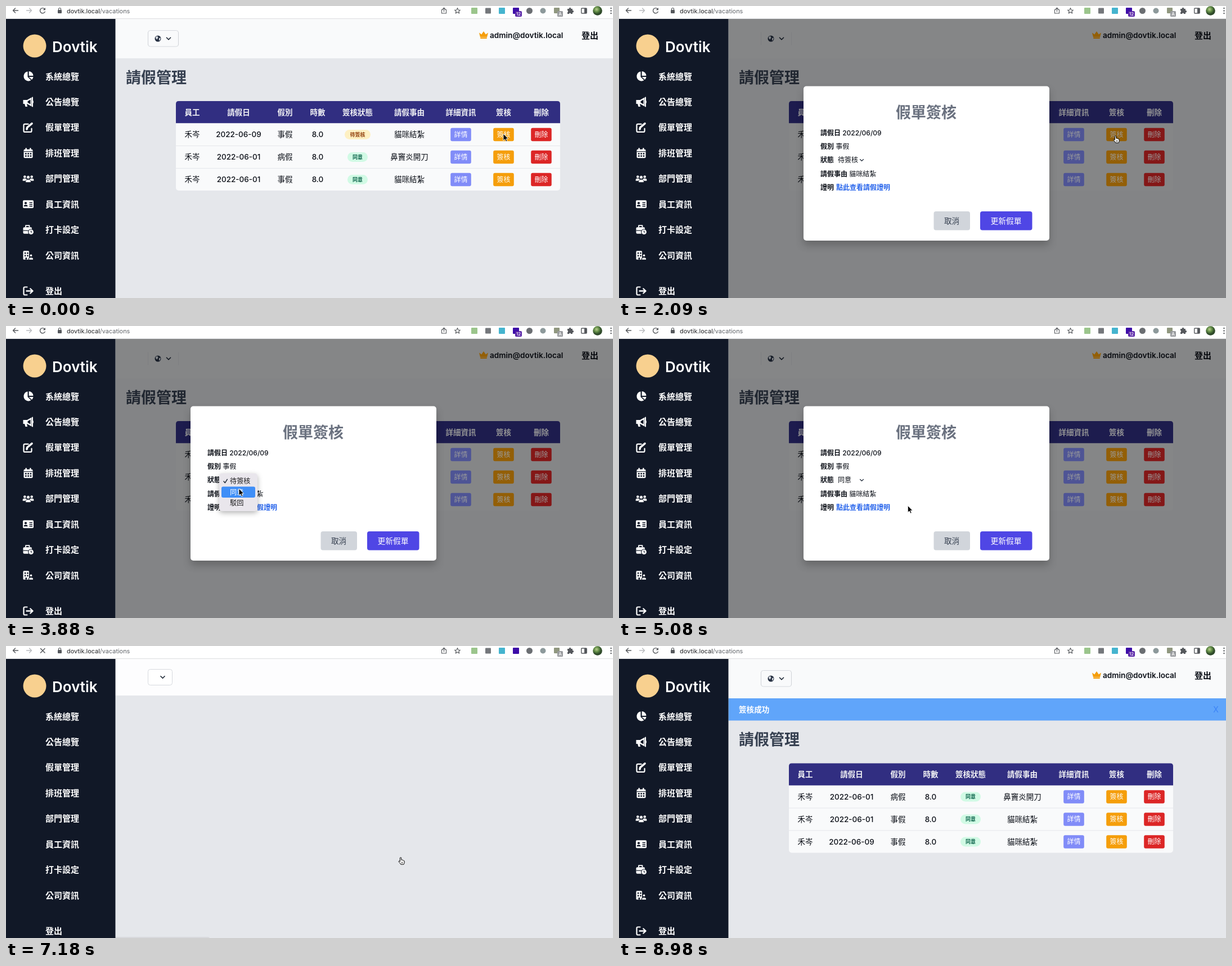
An HTML page for the animation above (9.28 s loop, 1079 px wide and 519 px high).

```html
<!DOCTYPE html>
<html lang="zh-Hant">
<head>
<meta charset="utf-8">
<title>請假管理</title>
<style>
  html, body { margin: 0; width: 100%; height: 100%; overflow: hidden; background: #fff; }
  svg { display: block; width: 1079px; height: 519px; font-family: Inter, "Noto Sans CJK TC", "Noto Sans CJK", sans-serif; }
  text { white-space: pre; }
  .off { display: none; }
  .line { fill: none; stroke-linecap: round; stroke-linejoin: round; }
  .surface { fill: #f9fafb; }
  .dim .surface { fill: #dddfe1; }
  .dim .ground { fill: #dadcdf; }
  .dim .rule { display: none; }
  #modal > .card { filter: drop-shadow(0 8px 7px rgba(0, 0, 0, .22)); }
  #menu > .card { filter: drop-shadow(0 3px 5px rgba(0, 0, 0, .3)); }
</style>
</head>
<body>
<svg id="stage" viewBox="0 0 1079 519" xmlns="http://www.w3.org/2000/svg"></svg>
<script>
const LOOP = 9280;
const NIGHT = '#111827';
const stage = document.getElementById('stage');

// Markup helpers; text is centred vertically on y.
const text = (x, y, str, size, fill, weight = 400, anchor = 'start') =>
  `<text x="${x}" y="${y + size * 0.37}" font-size="${size}" fill="${fill}" font-weight="${weight}" text-anchor="${anchor}">${str}</text>`;
const mid = (x, y, str, size, fill, weight) => text(x, y, str, size, fill, weight, 'middle');
const rect = (x, y, w, h, fill, r = 0, extra = '') =>
  `<rect x="${x}" y="${y}" width="${w}" height="${h}" rx="${r}" fill="${fill}" ${extra}/>`;
const dot = (x, y, r, fill) => `<circle cx="${x}" cy="${y}" r="${r}" fill="${fill}"/>`;
const line = (d, color, w = 1.4) => `<path class="line" d="${d}" stroke="${color}" stroke-width="${w}"/>`;
const shape = (d, fill = '#fff') => `<path d="${d}" fill="${fill}"/>`;
const group = (id, body, extra = '') => `<g id="${id}" ${extra}>${body}</g>`;
const at = (x, y, body) => `<g transform="translate(${x} ${y})">${body}</g>`;

function toolbar() {
  const ink = '#55585c';
  const arrow = 'M4.5 0H-4.5M-.5 -4L-4.5 0L-.5 4';
  return rect(0, 0, 1079, 22.5, '#fff') + rect(0, 22, 1079, 1, '#dcdde0') +
    group('pill', rect(80, -4, 286, 22, '#f1f3f4')) +
    at(17, 8, line(arrow, ink)) +
    `<g transform="translate(41 8) scale(-1 1)">${line(arrow, '#b9bbbe')}</g>` +
    group('reload', line('M69.3 10.2A4.6 4.6 0 1 1 68.6 5.2', ink) + shape('M70 3V7.3H65.7Z', ink)) +
    group('stop', line('M61.5 4.5L69 12M69 4.5L61.5 12', ink, 1.5)) +
    rect(92, 7, 7, 6, ink, 1) + line('M93.5 7V5.5A2 2 0 0 1 97.5 5.5V7', ink, 1.2) +
    text(108, 8.5, 'dovtik.local<tspan fill="#5f6368">/vacations</tspan>', 10.9, '#202124') +
    line('M776.5 6.5H774.5V13H782.5V6.5H780.5M778.5 10V3.5M776.3 5.5L778.5 3.2L780.7 5.5', ink, 1.1) +
    line('M802.5 3.5L804 7L807.5 7.2L804.8 9.5L805.8 13L802.5 11L799.2 13L800.2 9.5L797.5 7.2L801 7Z', ink, 1.1) +
    rect(827, 3, 11, 11, '#9bc58c', 1) + rect(852, 3.5, 10, 10, '#74777b', 1) +
    rect(876, 3, 11, 11, '#45b4cf', 1) + rect(901, 3, 11, 11, '#3c0ca8', 1) +
    group('badge', rect(905, 9, 12, 10, '#5b27a8', 2) + mid(911, 14, '12', 8, '#fff', 500)) +
    dot(930.5, 8.5, 5.5, '#6b6e72') + dot(954.5, 8.5, 5, '#8d999b') +
    rect(974, 3, 10, 10, '#90977f', 1) + rect(980, 9, 10, 10, '#9a9c9f', 1.5) + mid(985, 14, 'A', 8, '#fff', 500) +
    shape('M998 5H1001A1.7 1.7 0 1 1 1004.2 5H1007V8A1.7 1.7 0 1 1 1007 11.3V14H1004.2A1.6 1.6 0 0 0 1001 14H998V11.2A1.7 1.7 0 0 0 998 8Z', ink) +
    rect(1022.7, 4, 9.5, 9, 'none', 1, `stroke="${ink}" stroke-width="1.4"`) + rect(1028, 4, 4, 9, ink) +
    dot(1051.5, 8.5, 8.3, 'url(#leaf)') +
    [4, 8.5, 13].map(y => dot(1075.5, y, 1.2, ink)).join('');
}

const person = (x, y, s) => dot(x, y - 3 * s, 2.5 * s, '#fff') +
  shape(`M${x - 4 * s} ${y + 5 * s}V${y + 3 * s}Q${x - 4 * s} ${y + .4 * s} ${x} ${y + .4 * s}T${x + 4 * s} ${y + 3 * s}V${y + 5 * s}Z`);

const glyphs = [
  shape('M-1 1V-8.5A8.5 8.5 0 1 0 5 7Z') + shape('M1.2 -9A8.5 8.5 0 0 1 9 -1H1.2Z') + shape('M1.2 1H9A8 8 0 0 1 6.3 6Z'),
  shape('M-9 -3.5H-2L6 -8V8L-2 3.5H-9Z') + shape('M-6.5 3H-2.5L-1.5 8.5H-5Z') +
    line('M7.5 -8V8', '#fff', 2) + line('M8.5 -1.5V1.5', '#fff', 1.5) + shape('M-1 -1.3L4 -4V4L-1 1.3Z', NIGHT),
  line('M0 -6H-6Q-8 -6 -8 -4V6Q-8 8 -6 8H4Q6 8 6 6V2', '#fff', 2.2) + line('M-2.5 3L-1.8 0L6.5 -7', '#fff', 3.6),
  rect(-8, -6.5, 16, 15.5, '#fff', 2) + rect(-5, -9, 2.4, 5, '#fff', 1) + rect(2.6, -9, 2.4, 5, '#fff', 1) +
    rect(-8, -3.2, 16, 1.1, NIGHT) + [-5.5, -1.2, 3.1].map(x => rect(x, -.2, 2.6, 2.6, NIGHT) + rect(x, 4, 2.6, 2.6, NIGHT)).join(''),
  person(-6.2, -.6, .9) + person(6.2, -.6, .9) +
    `<g stroke="${NIGHT}" stroke-width=".7">${person(0, 1, 1.15)}</g>`,
  rect(-9.5, -7, 19, 14, '#fff', 2) + dot(-4.5, -2, 2.1, NIGHT) + shape('M-8 4Q-8 1 -4.5 1T-1 4Z', NIGHT) +
    rect(2, -3.5, 5.5, 1.5, NIGHT) + rect(2, -.3, 5.5, 1.5, NIGHT) + rect(2, 2.8, 5.5, 1.5, NIGHT),
  rect(-9, -4.5, 15.5, 11.5, '#fff', 2) + line('M-4.5 -5V-7.5H2V-5', '#fff', 1.8) + rect(-9, .8, 9, 1.2, NIGHT) +
    dot(5, 4, 5.5, NIGHT) + dot(5, 4, 4.4, '#fff') + line('M5 1.8V4.3H6.7', NIGHT, 1.1),
  rect(-9, -8, 10.5, 15.5, '#fff', 1.5) + [-6.6, -2.2].map(x => rect(x, -5.2, 2.4, 2.6, NIGHT) + rect(x, -.6, 2.4, 2.6, NIGHT)).join('') +
    rect(-5, 4, 2.6, 3.5, NIGHT) + `<g stroke="${NIGHT}" stroke-width="1.1">${person(5, 3.2, 1)}</g>`,
  line('M-2 -7H-6Q-8 -7 -8 -5V5Q-8 7 -6 7H-2', '#fff', 2.2) + line('M-3 0H7M3.8 -4L8 0L3.8 4', '#fff', 2.4)
];

function sidebar() {
  const names = ['系統總覽', '公告總覽', '假單管理', '排班管理', '部門管理', '員工資訊', '打卡設定', '公司資訊', '登出'];
  const rowY = i => i < 8 ? 125 + 45.45 * i : 506.5;
  return rect(0, 23, 194.5, 496, NIGHT) + dot(51, 71, 20.5, '#f8d08f') +
    text(82, 72, 'Dovtik', 26, '#fff', 600) +
    names.map((n, i) => text(70, rowY(i), n, 15, '#fff', 700)).join('') +
    group('glyphs', glyphs.map((g, i) => at(39.5, rowY(i), g)).join(''));
}

const chevron = (x, y, s, w) => line(`M${x - s} ${y - s / 2}L${x} ${y + s / 2}L${x + s} ${y - s / 2}`, '#1f2937', w);

function header() {
  return '<rect class="surface" x="194.5" y="23" width="885" height="70"/>' +
    group('patch', rect(194.5, 23, 171.5, 70, '#f1f2f0') + rect(194.5, 93, 171.5, 426, '#e5e7eb') +
      rect(252.5, 43.5, 54, 28.5, 'none', 4, 'stroke="#cfd2d8"')) +
    rect(252.5, 43.5, 54, 28.5, '#f9fafb', 4, 'class="rule" stroke="#d6d9de"') +
    line('M252.5 47V69M306.5 47V69', '#d0d3d8', 1) +
    dot(270, 58, 5.5, '#263042') + shape('M266 55L269 53.5L270.5 56L268.5 59.5L266.5 58Z', '#d9dde3') +
    shape('M272 57L274.7 56.5L274 60.5L272 61.5Z', '#d9dde3') + chevron(289, 58, 3.5, 1.7) +
    shape('M841 47.5L845.2 50.5L849 45L852.8 50.5L857 47.5L855 55.5H843Z', '#f59e0b') + rect(843, 56, 12, 2, '#f59e0b', 1) +
    text(860, 52, 'admin@dovtik.local', 13.6, '#0b0f17', 600) + text(1023, 52, '登出', 15, '#0b0f17', 700);
}

const columns = [331, 413.5, 496, 554, 625, 717, 808.5, 884.5, 951.5];
const button = (x, y, label, fill, id = '') =>
  rect(x - 18.3, y - 11.7, 36.6, 23.4, fill, 3, id && `id="${id}"`) + mid(x, y, label, 12, '#fff', 500);

function row(i, date, kind, agreed, reason, id) {
  const y = 228.5 + 40 * i;
  const cells = ['禾岑', date, kind, '8.0', '', reason];
  const w = agreed ? 36 : 46;
  return (i ? rect(302, y - 20.5, 683, 1, '#e5e7eb', 0, 'class="rule"') : '') +
    cells.map((c, k) => c && mid(columns[k], y, c, 13.5, '#0b0f17', 500)).join('') +
    rect(625 - w / 2, y - 8.5, w, 17, agreed ? '#d1fae5' : '#fef0c3', 8.5) +
    mid(625, y, agreed ? '同意' : '待簽核', 9, agreed ? '#065f46' : '#92400e', 700) +
    button(columns[6], y, '詳情', '#818cf8') + button(columns[7], y, '簽核', '#f59e0b', id) +
    button(columns[8], y, '刪除', '#dc2626');
}

function content() {
  const heads = ['員工', '請假日', '假別', '時數', '簽核狀態', '請假事由', '詳細資訊', '簽核', '刪除'];
  const sick = i => row(i, '2022-06-01', '病假', true, '鼻竇炎開刀');
  const leave = i => row(i, '2022-06-01', '事假', true, '貓咪結紮');
  return text(213, 127, '請假管理', 27, '#374151', 700) +
    '<rect class="surface" x="302" y="190" width="683" height="138" rx="5"/>' +
    group('rows', rect(302, 200, 64, 128, '#f1f2f3', 5) + rect(302, 248, 64, 1, '#d5d7dc') + rect(302, 288, 64, 1, '#d5d7dc')) +
    shape('M302 208.3V174Q302 169 307 169H980Q985 169 985 174V208.3Z', '#312e81') +
    heads.map((h, k) => mid(columns[k], 188.7, h, 13.5, '#f3f4f6', 700)).join('') +
    group('before', row(0, '2022-06-09', '事假', false, '貓咪結紮', 'approve') + sick(1) + leave(2)) +
    group('after', sick(0) + leave(1) + row(2, '2022-06-09', '事假', true, '貓咪結紮'));
}

function modal() {
  const field = (y, label, value = '') => text(358, y, `${label}<tspan font-weight="500"> ${value}</tspan>`, 12, '#0b0f17', 700);
  return rect(194.5, 23, 885, 496, '#000', 0, 'opacity=".4"') +
    rect(328, 142.5, 437, 274.5, '#fff', 5, 'class="card"') +
    mid(546, 189, '假單簽核', 27, '#6b7280', 700) +
    field(225.5, '請假日', '2022/06/09') + field(250, '假別', '事假') + field(274, '狀態') +
    group('pending', text(389, 274, '待簽核', 12, '#0b0f17', 500)) + group('agreed', text(389, 274, '同意', 12, '#0b0f17', 500)) +
    chevron(431.5, 274, 3, 1.1) + field(299, '請假事由', '貓咪結紮') + field(323, '證明') +
    text(386, 323, '點此查看請假證明', 12, '#2563eb', 700) +
    rect(559.5, 365, 64.5, 33.5, '#d1d5db', 4) + mid(591.5, 382, '取消', 13.6, '#374151', 500) +
    rect(642, 365, 92.5, 33.5, '#4f46e5', 4, 'id="save"') + mid(688, 382, '更新假單', 13.8, '#fff', 500) +
    group('menu', rect(379, 262, 68, 67, '#e9e6ec', 5, 'class="card"') + rect(383, 285.5, 60, 19.5, '#3f8ef7', 3) +
      line('M387 276L389.3 278.8L393.3 272.5', '#1f2937', 1.4) + text(398, 275, '待簽核', 12.2, '#1c1c1e') +
      text(398, 295, '同意', 12.2, '#fff') + text(398, 314.5, '駁回', 12.2, '#1c1c1e'));
}

stage.innerHTML =
  `<defs><radialGradient id="leaf" cx=".4" cy=".35"><stop offset="0" stop-color="#b9cf8d"/>
   <stop offset=".55" stop-color="#5f8a44"/><stop offset="1" stop-color="#2f4a2a"/></radialGradient></defs>` +
  '<rect class="ground" x="194.5" y="23" width="885" height="496" fill="#e5e7eb"/>' +
  group('page', header() + group('content', content()) +
    group('notice', rect(194.5, 93, 885, 39.5, '#60a5fa') + text(213, 113, '簽核成功', 13.6, '#fff', 700) +
      mid(1061, 113, 'X', 14, '#3b82f6', 400))) +
  group('blank', rect(194.5, 23, 885, 65, '#fdfdfe') + rect(252.5, 41.5, 43, 28, '#fff', 4, 'stroke="#d6d9de"') +
    chevron(278.5, 55.5, 3.5, 1.7) + rect(190, 517, 172, 6, '#d8d9dd', 3)) +
  group('modal', modal()) + sidebar() + toolbar() +
  group('arrow', '<path d="M0 0V12.3L2.9 9.7L4.9 14L6.9 13.1L5 8.9H8.8Z" fill="#000" stroke="#fff" stroke-width=".9"/>') +
  group('hand', `<path d="M-2.6 -5A1.2 1.2 0 0 1 -.2 -5V-1.8Q1.6 -2.3 2 -1.2Q3.6 -1.6 3.9 -.4Q5.2 -.6 5.2 1V3Q5 4.6 4 6.2H-1.2
    Q-2.4 3.8 -4.9 1.5Q-5.2 -.2 -3.7 .2L-2.6 1.2Z" fill="#fff" stroke="#000"/>` + line('M.2 2V4.2M2 2V4.2', '#000', .7));

const part = {};
stage.querySelectorAll('[id]').forEach(el => part[el.id] = el);
const show = (id, on) => part[id].classList.toggle('off', !on);

// Pointer legs: start, end, from x, y, to x, y.
const legs = [
  [0, 1, 884, 227, 884, 227],
  [150, 300, 884, 227, 884, 237],
  [2390, 3430, 884, 232, 421, 272],
  [3580, 3880, 421, 272, 414, 289],
  [4780, 5530, 414, 290, 696, 373],
  [5530, 5680, 696, 373, 703, 382],
  [7330, 7331, 700, 376, 700, 376],
  [7630, 8230, 700, 376, 967, 405],
  [8380, 8980, 967, 405, 1072, 530]
];

function pointer(t) {
  const [a, b, x0, y0, x1, y1] = legs.filter(l => l[0] <= t).pop();
  const p = Math.min(1, (t - a) / (b - a));
  const e = p * p * (3 - 2 * p);
  return [x0 + (x1 - x0) * e, y0 + (y1 - y0) * e];
}

// The screen refreshes every 150 ms, with a re-sync at 1490 and at 2980.
const tick = t => {
  const base = Math.min(2, Math.floor(t / 1490)) * 1490;
  return base + Math.floor((t - base) / 150) * 150;
};

function draw(time) {
  const t = tick(time % LOOP);
  const within = (a, b) => t >= a && t < b;
  const open = within(2090, 7180), blank = within(7180, 7330), done = t >= 7330;
  const loading = within(6580, 7330), leaving = within(6580, 7180), picked = t >= 4480;

  stage.classList.toggle('dim', open);
  show('modal', open);
  show('page', !blank);
  show('blank', blank);
  show('glyphs', !blank);
  show('badge', !blank);
  show('notice', done);
  show('before', !done);
  show('after', done);
  show('reload', !loading);
  show('stop', loading);
  show('patch', leaving);
  show('rows', leaving);
  show('pill', leaving);
  show('menu', within(3730, 4480));
  show('pending', !picked);
  show('agreed', picked);
  part.content.setAttribute('transform', `translate(0 ${done ? 39.5 : 0})`);

  const shades = ['#df8c0b', '#c96f0a', '#b45309'];
  part.approve.setAttribute('fill', within(300, 2090) ? shades[Math.min(2, Math.floor((t - 300) / 150))] : '#f59e0b');
  part.save.setAttribute('fill', t >= 5680 ? '#4338ca' : '#4f46e5');

  const hand = within(300, 2540) || within(5680, 7330);
  show('hand', hand);
  show('arrow', !hand);
  part[hand ? 'hand' : 'arrow'].setAttribute('transform', `translate(${pointer(t).map(v => v.toFixed(1)).join(' ')})`);
}

const start = performance.now();
function frame() {
  draw(performance.now() - start);
  requestAnimationFrame(frame);
}
frame();
</script>
</body>
</html>
```
